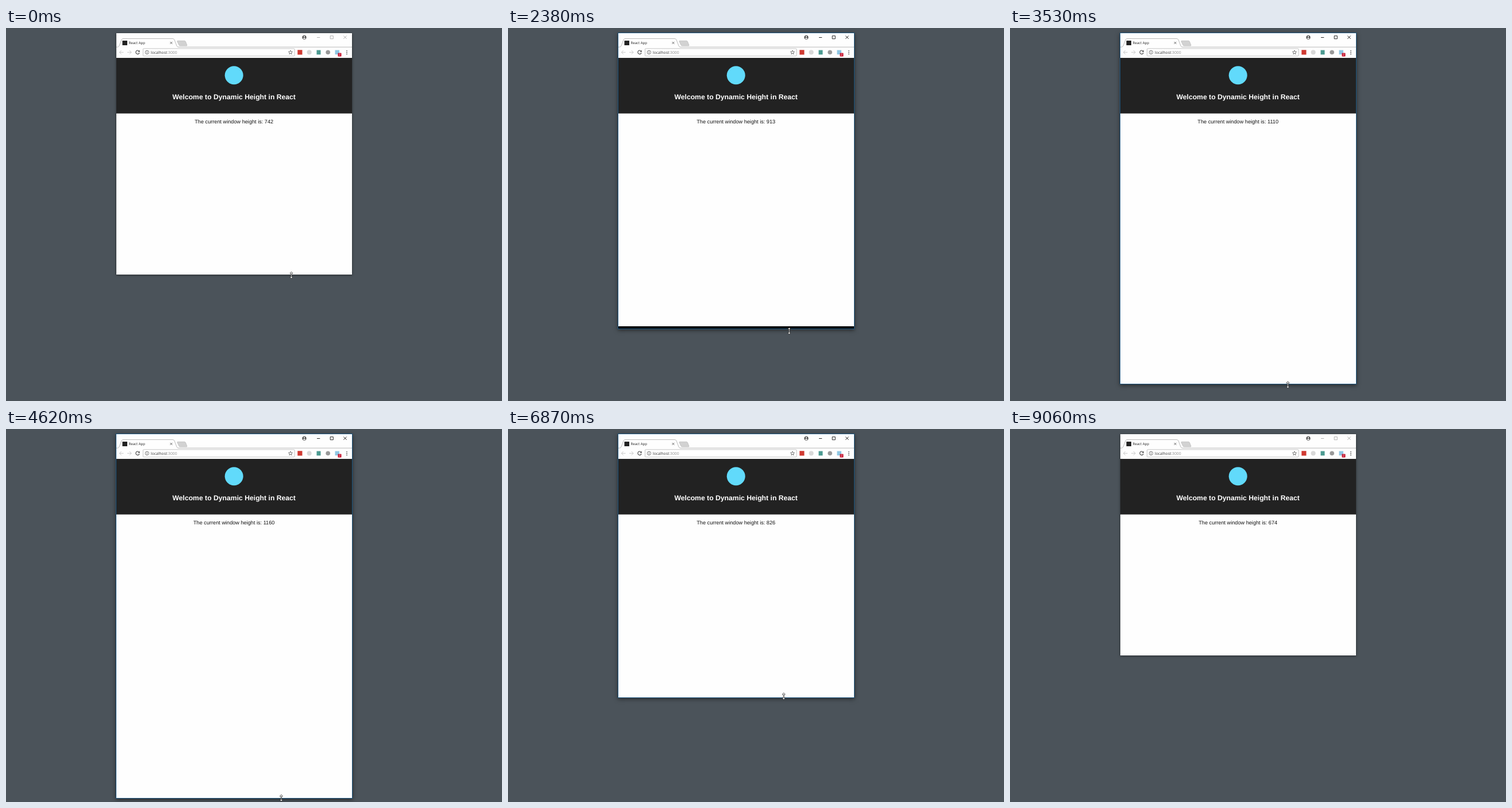
An HTML page that plays this animation: 863 px wide and 649 px high, repeating every 9160 ms.

```html
<!DOCTYPE html>
<html lang="en">
<head>
<meta charset="utf-8">
<title>Dynamic Height</title>
<style>
  html, body { margin: 0; width: 100%; height: 100%; overflow: hidden; background: #4b535a; }
  svg { display: block; position: absolute; left: 0; top: 0; }
  text { text-rendering: geometricPrecision; }
  .page { font-family: "Liberation Sans", Arial, sans-serif; text-anchor: middle; }
  .chrome { font-family: "Open Sans", "Noto Sans", sans-serif; }
  #frame { position: absolute; left: 192px; top: 9px; width: 410px; background: #fefefe;
    box-shadow: 0 1px 4px rgba(0,0,0,.5); }
  #frame.active { box-shadow: 0 0 0 1px #1d5680, 0 2px 7px 1px rgba(0,0,0,.5); }
  #gap { position: absolute; left: 0; right: 0; bottom: 0; background: #000; }
</style>
</head>
<body>
<div id="frame"><div id="gap"></div></div>
<svg width="863" height="649" viewBox="0 0 863 649" fill="none">
  <!-- tab strip -->
  <path d="M192 33.2H194Q196 33 197 31L201 20.5Q202 18.5 204 18.5H290Q292 18.5 293 20.5L297 31Q298 33.2 300 33.2H602" stroke="#a9a9a9" stroke-width=".8"/>
  <path d="M299 22.3H310.5Q312 22.3 312.7 24L315 30Q315.3 31 314 31H303Q301.5 31 301 29.7L298 23.5Q297.5 22.3 299 22.3Z" fill="#d2d2d2" stroke="#b0b0b0" stroke-width=".6"/>
  <rect x="202.5" y="22" width="8.5" height="8" fill="#222"/>
  <text class="chrome" x="213.5" y="28.2" font-size="6.1" fill="#222">React App</text>
  <path d="M285.6 24L289.4 27.8M289.4 24L285.6 27.8" stroke="#555" stroke-width=".9"/>

  <!-- window buttons -->
  <circle cx="519" cy="16.3" r="3.6" fill="#555"/>
  <circle cx="519" cy="15.2" r="1.1" fill="#fff"/>
  <path d="M516.8 18.4Q519 15.8 521.2 18.4Q519 20 516.8 18.4Z" fill="#fff"/>
  <path id="buttons" d="M541 16.5H546.3M564.2 13.7H569.3V18.8H564.2ZM587.3 13.5L592.7 18.9M592.7 13.5L587.3 18.9" stroke-width=".9"/>

  <!-- toolbar -->
  <g stroke="#c8c8c8">
    <path d="M204.5 42.3H197.5M200.7 39L197.4 42.3L200.7 45.6"/>
    <path d="M211 42.3H218M214.8 39L218.1 42.3L214.8 45.6"/>
  </g>
  <path d="M231.7 40.3A3.2 3.2 0 1 0 232.1 43.2" stroke="#444" stroke-width="1.1"/>
  <path d="M232.6 38.6V41.7H229.5Z" fill="#444"/>
  <rect x="238.5" y="35.8" width="263.5" height="13" rx="1" fill="#fff" stroke="#b5b5b5" stroke-width=".8"/>
  <circle cx="245.4" cy="42.3" r="3.2" stroke="#555" stroke-width=".8"/>
  <path d="M245.4 41.8V44.2M245.4 40.2V41.1" stroke="#555" stroke-width=".9"/>
  <text class="chrome" x="252" y="44.8" font-size="6.75" fill="#333">localhost<tspan fill="#888">:3000</tspan></text>
  <path id="star" stroke="#555" stroke-width=".8"/>
  <rect x="507.3" y="38.2" width="8.2" height="8.2" fill="#cf3a32"/>
  <circle cx="527.6" cy="42.3" r="4" fill="#d8d8d8"/>
  <rect x="540.5" y="38.5" width="7" height="7.7" fill="#4c9a91"/>
  <circle cx="560.2" cy="42.3" r="3.8" fill="#999"/>
  <rect x="572.5" y="38.5" width="7.5" height="7.5" fill="#8fc7e3"/>
  <rect x="577.5" y="43.5" width="6" height="6" rx=".6" fill="#c5112b"/>
  <text class="page" x="580.5" y="48.4" font-size="5" fill="#fff">2</text>
  <path d="M593 39.5V45.7" stroke="#444" stroke-width="1.7" stroke-linecap="round" stroke-dasharray="0 2.9"/>

  <!-- page -->
  <rect x="192" y="52" width="410" height="96.7" fill="#222"/>
  <circle cx="396.7" cy="82.3" r="16" fill="#61dafb"/>
  <text class="page" x="396.7" y="124" font-size="12.2" font-weight="bold" fill="#fff">Welcome to Dynamic Height in React</text>
  <text class="page" id="label" x="396.7" y="165.6" font-size="9.16" fill="#111"></text>

  <path id="cursor" fill="#fff" stroke="#222" stroke-width=".7"/>
</svg>
<script>
const LOOP = 9160, TICKS = 73;
const PAGE_TOP = 52.04, SCALE = 0.5087;
const byId = id => document.getElementById(id);

// Turning points of the drag: tick, bottom edge of the window.
const DRAG = [[0, 429.5], [10.4, 429.5], [19, 523], [27, 615.2], [34, 642.1],
  [37.25, 642.1], [46, 557.5], [54, 475.7], [63.3, 394.9], [TICKS, 394.9]];
const RELEASE = 63.5, GONE = 69, FOCUS = 4, BLUR = 72;

const RESIZE = "M0-6L2.6-3H.7V3H2.6L0 6L-2.6 3H-.7V-3H-2.6Z";
const ARROW = "M0 0V9L2.1 7.1L3.5 10.2L4.8 9.6L3.5 6.6H6.2Z";

const mix = (a, b, k) => a + (b - a) * k;

function bottomAt(tick) {
  const at = Math.max(0, tick);
  const i = DRAG.findIndex(([end]) => end > at);
  const [t0, y0] = DRAG[i - 1], [t1, y1] = DRAG[i];
  return mix(y0, y1, (at - t0) / (t1 - t0));
}

function cursorAt(tick) {
  const x = 487 + 9.5 * Math.cos(2 * Math.PI * tick / 90);
  const y = bottomAt(tick + 0.3) + 0.5;
  const k = Math.max(0, (tick - RELEASE) / (GONE - RELEASE));
  return [mix(x, 594, k), mix(y, 540, k)];
}

function draw(now) {
  const tick = Math.round(now % LOOP / LOOP * TICKS) % TICKS;
  const active = tick >= FOCUS && tick < BLUR;

  // The page reports and paints its height a little after the window moves.
  const bottom = bottomAt(tick), painted = bottomAt(tick - 0.6);
  const height = Math.round((painted - PAGE_TOP) / SCALE);

  byId("frame").style.height = Math.floor(bottom) - 9 + "px";
  byId("frame").className = active ? "active" : "";
  byId("gap").style.height = Math.max(0, Math.round(bottom - painted - 2.5)) + "px";
  byId("buttons").setAttribute("stroke", active ? "#111" : "#aaa");
  byId("label").textContent = "The current window height is: " + height;

  const cursor = byId("cursor");
  cursor.setAttribute("d", tick < RELEASE ? RESIZE : ARROW);
  cursor.setAttribute("transform", `translate(${cursorAt(tick)})`);
  cursor.setAttribute("visibility", tick < GONE ? "visible" : "hidden");
}

const starPoints = Array.from({ length: 10 }, (_, i) => {
  const angle = (i / 5 - 0.5) * Math.PI, radius = i % 2 ? 1.7 : 3.7;
  return [495 + radius * Math.cos(angle), 42.5 + radius * Math.sin(angle)];
});
byId("star").setAttribute("d", "M" + starPoints.join("L") + "Z");

const began = performance.now();
function play() {
  draw(performance.now() - began);
  requestAnimationFrame(play);
}
play();
</script>
</body>
</html>
```
